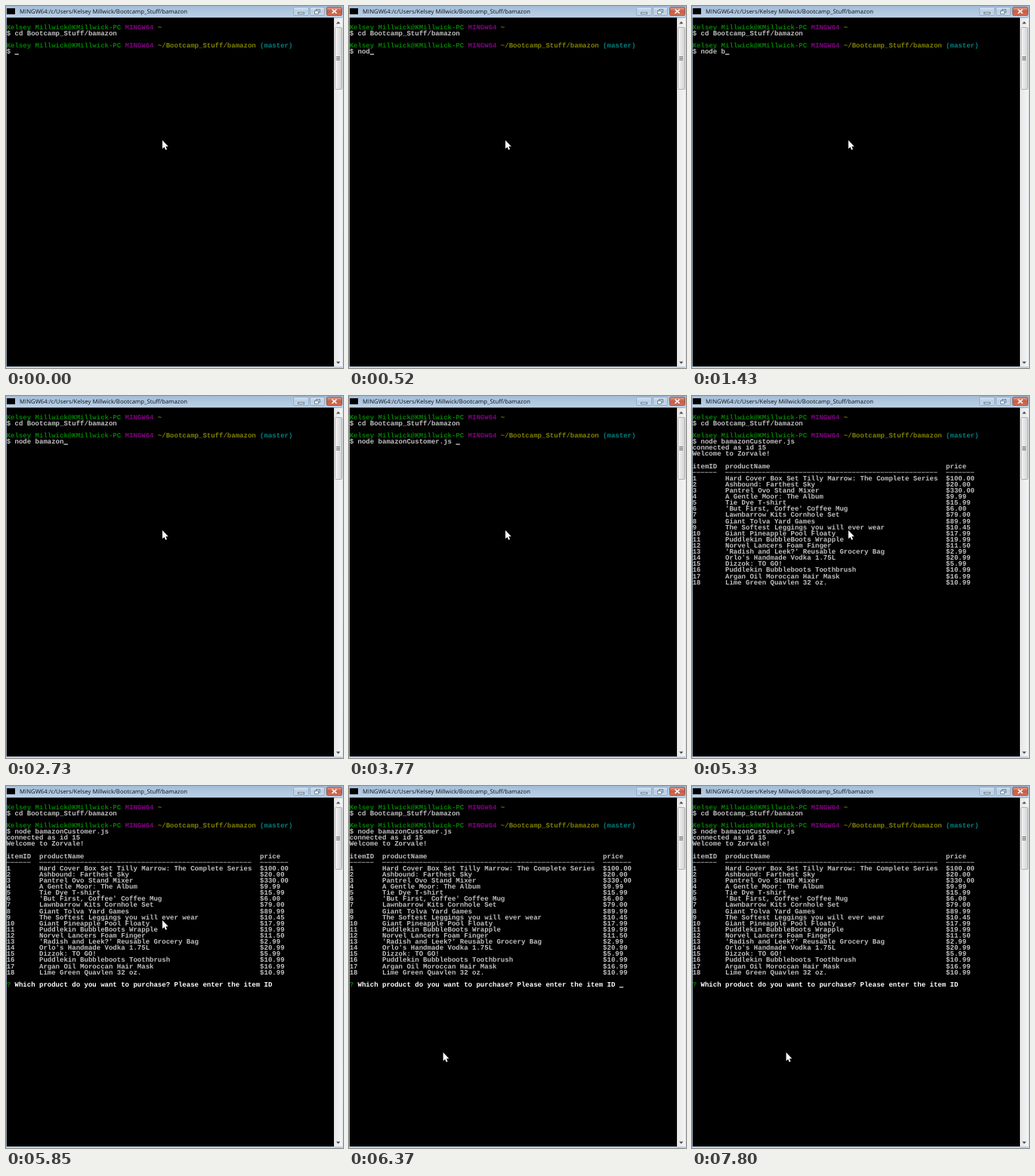
An HTML page with a canvas that plays this animation: 446 by 480 pixels, repeating every 8 s.

```html
<!DOCTYPE html>
<html lang="en">
<head>
<meta charset="utf-8">
<title>Terminal</title>
<style>
  html, body { margin: 0; width: 100%; height: 100%; overflow: hidden; background: #000; }
  canvas { display: block; width: 446px; height: 480px; }
</style>
</head>
<body>
<canvas id="stage" width="446" height="480"></canvas>
<script>
const ctx = document.getElementById('stage').getContext('2d');
const LOOP = 8000;
const LEFT = 0.7, TOP = 24.4, CELL_W = 5.41, CELL_H = 8.11;
const GREY = '#c0c0c0', WHITE = '#fff', GREEN = '#008000', PURPLE = '#800080',
      OLIVE = '#808000', TEAL = '#008080', GLASS = '#bdd0e4';

const USER = 'Kelsey Millwick';
const PROMPT = USER + '@KMillwick-PC';
const COMMAND = 'node bamazonCustomer.js ';
const QUESTION = 'Which product do you want to purchase? Please enter the item ID';

const products = [
  ['Hard Cover Box Set Tilly Marrow: The Complete Series', '100.00'],
  ['Ashbound: Farthest Sky', '20.00'],
  ['Pantrel Ovo Stand Mixer', '330.00'],
  ['A Gentle Moor: The Album', '9.99'],
  ['Tie Dye T-shirt', '15.99'],
  ["'But First, Coffee' Coffee Mug", '6.00'],
  ['Lawnbarrow Kits Cornhole Set', '79.00'],
  ['Giant Tolva Yard Games', '89.99'],
  ['The Softest Leggings you will ever wear', '10.45'],
  ['Giant Pineapple Pool Floaty', '17.99'],
  ['Puddlekin BubbleBoots Wrapple', '19.99'],
  ['Norvel Lancers Foam Finger', '11.50'],
  ["'Radish and Leek?' Reusable Grocery Bag", '2.99'],
  ["Orlo's Handmade Vodka 1.75L", '20.99'],
  ['Dizzok: TO GO!', '5.99'],
  ['Puddlekin Bubbleboots Toothbrush', '10.99'],
  ['Argan Oil Moroccan Hair Mask', '16.99'],
  ['Lime Green Quavlen 32 oz.', '10.99']
];

// [start ms, typed characters, cursor row (0 = hidden)]
const typing = [
  [0, 0, 4], [130, 1, 4], [390, 2, 4], [520, 3, 4], [780, 4, 4],
  [1040, 4, 0], [1170, 5, 4], [1430, 6, 4], [1560, 7, 4], [1690, 8, 4],
  [1820, 9, 4], [2210, 11, 4], [2340, 12, 0], [2730, 12, 4], [3250, 12, 0],
  [3510, 13, 4], [3770, 24, 4], [4030, 24, 0], [4160, 24, 5], [4680, 24, 0],
  [6240, 24, 29], [6760, 24, 0], [7280, 24, 29], [7800, 24, 0]
];

// [start ms, x, y]
const pointer = [[0, 207, 178], [6110, 187, 222], [6240, 145, 310], [6370, 124.6, 353.3]];

const at = (list, t) => list.filter(step => step[0] <= t).pop();

function rect(color, x, y, w, h) {
  ctx.fillStyle = color;
  ctx.fillRect(x, y, w, h);
}

function shape(color, points) {
  ctx.fillStyle = color;
  ctx.beginPath();
  points.forEach(([x, y]) => ctx.lineTo(x, y));
  ctx.closePath();
  ctx.fill();
}

function fade(x0, y0, x1, y1, ...colors) {
  const g = ctx.createLinearGradient(x0, y0, x1, y1);
  colors.forEach((c, i) => g.addColorStop(i / (colors.length - 1), c));
  return g;
}

function print(row, col, text, color = GREY) {
  ctx.fillStyle = color;
  [...text].forEach((ch, i) => {
    if (ch !== ' ') ctx.fillText(ch, LEFT + (col + i) * CELL_W, TOP + row * CELL_H + 6.3);
  });
}

function printRule(row, col, width) {
  for (let i = 0; i < width; i++) {
    rect(GREY, LEFT + (col + i) * CELL_W, TOP + row * CELL_H + 3.4, CELL_W * 0.88, 0.8);
  }
}

function button(x, w, colors, edge) {
  ctx.beginPath();
  ctx.roundRect(x + 0.5, 1.5, w - 1, 11, 1.5);
  ctx.fillStyle = fade(0, 1, 0, 13, ...colors);
  ctx.fill();
  ctx.strokeStyle = edge;
  ctx.lineWidth = 0.8;
  ctx.stroke();
}

function drawTitleBar() {
  rect(fade(0, 0, 0, 15, '#a3bcd8', '#b0c8e1', GLASS), 0, 0, 446, 15.4);
  rect('#000', 1, 3, 11, 8);
  ctx.font = '7.75px "Open Sans", sans-serif';
  ctx.fillStyle = '#0b1218';
  ctx.fillText('MINGW64:/c/Users/' + USER + '/Bootcamp_Stuff/bamazon', 18, 10);

  const pale = ['#d3e2f2', '#b9cee4', '#c8dbee'];
  button(380, 21, pale, '#8fa5bc');
  button(402, 20, pale, '#8fa5bc');
  button(424, 21, ['#e0a594', '#c85a43', '#d6755a'], '#8a4a42');

  rect('#6b7c8e', 386, 8, 9, 3);
  rect('#fff', 387, 9, 7, 1);
  ctx.strokeStyle = '#607286';
  ctx.strokeRect(410.5, 4.5, 5, 4);
  rect('#eef4fa', 408, 6, 6, 5);
  ctx.strokeRect(408.5, 6.5, 5, 4);

  ctx.strokeStyle = '#fff';
  ctx.lineWidth = 1.6;
  ctx.beginPath();
  ctx.moveTo(431.5, 4.5); ctx.lineTo(437.5, 9.7);
  ctx.moveTo(437.5, 4.5); ctx.lineTo(431.5, 9.7);
  ctx.stroke();
}

function drawFrame() {
  rect(GLASS, 0, 15, 0.8, 465);
  rect(GLASS, 0, 478, 446, 2);
  rect(fade(434, 0, 445, 0, '#e6e6e6', '#f4f4f4'), 434, 15.4, 12, 462.6);
  rect('#dbe4ed', 445, 15, 1, 465);
  shape('#4a4a4a', [[437, 23.5], [439.7, 20.5], [442.4, 23.5]]);
  shape('#4a4a4a', [[437, 471.5], [439.7, 474.5], [442.4, 471.5]]);

  ctx.beginPath();
  ctx.roundRect(435.5, 28.5, 9, 82, 1);
  ctx.fillStyle = fade(435, 0, 445, 0, '#f5f5f5', '#e4e4e4', '#cfcfd1');
  ctx.fill();
  ctx.strokeStyle = '#a2a2a2';
  ctx.lineWidth = 0.8;
  ctx.stroke();
  for (let y = 67; y <= 71; y += 2) rect('#6d6d6d', 437, y, 5, 1);
}

function drawPrompt(row, path) {
  print(row, 0, PROMPT, GREEN);
  print(row, 29, 'MINGW64', PURPLE);
  print(row, 37, path, OLIVE);
}

function drawTable() {
  print(5, 0, 'connected as id 15');
  print(6, 0, 'Welcome to Zorvale!');
  [[0, 'itemID', 6], [8, 'productName', 52], [62, 'price', 7]].forEach(([col, name, width]) => {
    print(8, col, name);
    printRule(9, col, width);
  });
  products.forEach(([name, price], i) => {
    print(10 + i, 0, String(i + 1));
    print(10 + i, 8, name);
    print(10 + i, 62, '$' + price);
  });
}

function drawPointer(x, y) {
  const arrow = [[0, 0], [0, 11.2], [2.5, 8.9], [4.1, 12.7], [6, 11.9], [4.4, 8.2], [7.8, 8.2]];
  const points = arrow.map(([dx, dy]) => [x + dx, y + dy]);
  shape('#000', points);
  ctx.strokeStyle = '#000';
  ctx.lineWidth = 1.2;
  ctx.stroke();
  shape('#fff', points);
}

function draw(t) {
  const [, typed, cursorRow] = at(typing, t);
  rect('#000', 0, 0, 446, 480);
  ctx.textRendering = 'geometricPrecision';
  drawTitleBar();
  drawFrame();

  ctx.font = 'bold 9px "Liberation Mono", monospace';
  drawPrompt(0, '~');
  print(1, 0, '$ cd Bootcamp_Stuff/bamazon');
  drawPrompt(3, '~/Bootcamp_Stuff/bamazon');
  print(3, 62, '(master)', TEAL);
  print(4, 0, '$ ' + COMMAND.slice(0, typed));
  if (t >= 5330) drawTable();
  if (t >= 5460) {
    print(29, 0, '?', GREEN);
    print(29, 2, QUESTION, WHITE);
  }
  if (cursorRow) {
    const col = { 4: 2 + typed, 5: 0, 29: 66 }[cursorRow];
    rect(GREY, LEFT + col * CELL_W, TOP + cursorRow * CELL_H + 6.5, CELL_W, 1.4);
  }

  const [, x, y] = at(pointer, t);
  drawPointer(x, y);
}

function tick() {
  draw(performance.now() % LOOP);
  requestAnimationFrame(tick);
}
tick();
</script>
</body>
</html>
```
